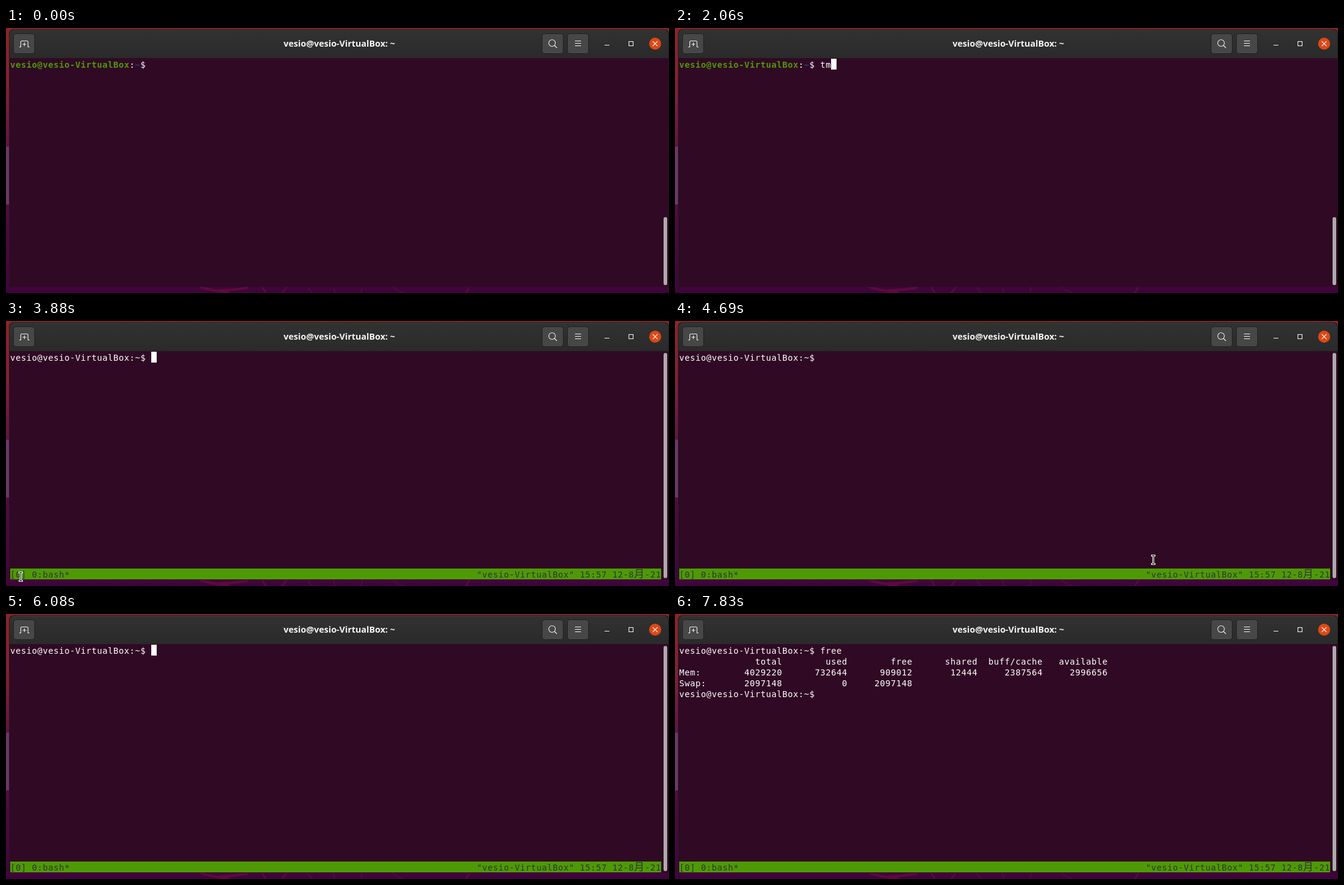
These frames come from a looping animation (1100x440 px, 8 s). An HTML page:

```html
<!DOCTYPE html>
<html lang="en">
<head>
<meta charset="utf-8">
<title>Terminal</title>
<style>
  html, body { margin: 0; width: 1100px; height: 440px; overflow: hidden; background: #300a24; }
  svg { display: block; }
  text { white-space: pre; }
  .mono { font: 14px "DejaVu Sans Mono", monospace; letter-spacing: .572px; fill: #fff; }
  .bold { font-weight: bold; }
  .title { font: bold 14.5px "Open Sans", "Noto Sans", sans-serif; fill: #f4f4f2; text-anchor: middle; }
  .status text { fill: #2e3436; }
  .wide { font: 17px "Noto Sans CJK SC", "Noto Sans CJK JP", sans-serif; }
  .btn { fill: #474747; stroke: #1f1f1f; }
  .icon { fill: none; stroke: #f0f0f0; stroke-width: 1.1; }
</style>
</head>
<body>
<svg width="1100" height="440" viewBox="0 0 1100 440">
  <defs>
    <linearGradient id="side" x2="0" y2="1">
      <stop offset="0" stop-color="#8c2426"/>
      <stop offset=".25" stop-color="#7f1f38"/>
      <stop offset=".5" stop-color="#5c0f46"/>
      <stop offset="1" stop-color="#40043c"/>
    </linearGradient>
    <linearGradient id="head" x2="0" y2="1">
      <stop offset="0" stop-color="#323232"/>
      <stop offset="1" stop-color="#2a2a2a"/>
    </linearGradient>
  </defs>

  <!-- desktop -->
  <rect width="1100" height="440" fill="url(#side)"/>
  <rect y="197" width="6" height="96" fill="#6c3768"/>
  <g fill="none" stroke="#5e0940" stroke-width="2.5">
    <path d="M322 430Q345 437 372 440M352 436Q380 435 402 431" stroke-width="4"/>
    <path d="M425 430L431 440M466 430L458 440M769 430L763 440"/>
    <path d="M500 430L508 440M543 430L546 440M591 430L589 440M641 430Q650 437 660 440" stroke-width="1.5"/>
  </g>

  <!-- window -->
  <path d="M5 430V10Q5 2 13 2H1092Q1100 2 1100 10V430Z" fill="#1c1c1c"/>
  <path d="M6 50V11Q6 3 14 3H1091Q1099 3 1099 11V50Z" fill="url(#head)"/>
  <path d="M12 3.5H1093" stroke="#3c3c3c"/>
  <rect x="6" y="50" width="1094" height="380" fill="#300a24"/>
  <rect x="12.5" y="9.5" width="35" height="33" rx="4" class="btn"/>
  <rect x="889.5" y="9.5" width="35" height="33" rx="4" class="btn"/>
  <rect x="931.5" y="9.5" width="35" height="33" rx="4" class="btn"/>
  <g class="icon">
    <path d="M22 31.5H24.5V23.5Q24.5 21.5 26.5 21.5H34.5Q36.5 21.5 36.5 23.5V31.5H39M30.5 24V30M27.5 27H33.5"/>
    <circle cx="906" cy="25" r="5.5"/>
    <path d="M910 29L914 33M944 21.5H954M944 25.5H954M944 29.5H954M993 28.5H1001"/>
    <rect x="1033.5" y="22.5" width="7" height="7"/>
  </g>
  <circle cx="1077" cy="26" r="10" fill="#dd4814"/>
  <path d="M1073 22L1081 30M1081 22L1073 30" class="icon"/>
  <text x="553" y="31" class="title">vesio@vesio-VirtualBox: ~</text>

  <rect id="thumb" x="1091" width="6" rx="3" fill="#aea9ac"/>
  <g id="shell" class="mono">
    <text x="7" y="66" class="bold" fill="#4e9a06">vesio@vesio-VirtualBox</text>
    <text x="205" y="66">:</text>
    <text x="214" y="66" class="bold" fill="#12488b">~</text>
    <text x="223" y="66">$</text>
  </g>
  <g id="status" class="mono status">
    <rect x="7" y="411" width="1080" height="18" fill="#4e9a06"/>
    <text x="7" y="426">[0] 0:bash*</text>
    <text x="781" y="426">"vesio-VirtualBox" 15:57 12-8</text>
    <text x="1042" y="426" class="wide">月</text>
    <text x="1060" y="426">-21</text>
  </g>
  <g id="rows" class="mono"></g>
  <text id="typed" class="mono" x="241" y="66"></text>
  <rect id="block" width="9" height="18" fill="#fff"/>
  <g id="pointer" fill="none" stroke-linecap="square">
    <path d="M-2 -7H2M0 -7V7M-2 7H2" stroke="#fff" stroke-width="3"/>
    <path d="M-2 -7H2M0 -7V7M-2 7H2" stroke="#111"/>
  </g>
</svg>
<script>
const LOOP = 8000, STEP = 80, BLINK = 580;
const TMUX = 2560, PROMPT = 2640, OUTPUT = 7250;
const PROMPT_COLS = 26;

const $ = id => document.getElementById(id);
const show = (id, on) => $(id).setAttribute('visibility', on ? 'visible' : 'hidden');
const set = (id, attrs) => { for (const k in attrs) $(id).setAttribute(k, attrs[k]); };

// each command with its key times; the negative time sets the first blink phase
const commands = [
  { text: 'tmux', keys: [1900, 2060, 2310, 2310] },
  { text: 'free', keys: [6150, 6330, 6500, 6670] }
];
const presses = [-590, ...commands.flatMap(c => c.keys), TMUX, OUTPUT];

// pointer moves, each from where the last one ended
const home = { x: 943.5, y: 416.5 };
const moves = [
  { from: 80, to: 720, x: 435.5, y: 137.5 },
  { from: 3160, to: 3880, x: 24.5, y: 424.5 },
  { from: 3960, to: 4120, x: 52.5, y: 418.5 },
  { from: 4210, to: 4690, x: 793.5, y: 396.5 },
  { from: 4770, to: 5090, x: 903.5, y: 424.5 },
  { from: 5090, to: 5250, x: 993.5, y: 420.5 },
  { from: 5250, to: 5650, x: 782.5, y: 234.5 }
];

const prompt = 'vesio@vesio-VirtualBox:~$';
const line = (label, ...cells) =>
  label.padEnd(7) + cells.map((c, i) => String(c).padStart(12)).join('');
const lines = [
  prompt,
  line('', 'total', 'used', 'free', 'shared', 'buff/cache', 'available'),
  line('Mem:', 4029220, 732644, 909012, 12444, 2387564, 2996656),
  line('Swap:', 2097148, 0, 2097148),
  prompt
];
const rows = lines.map((s, i) => {
  const el = document.createElementNS('http://www.w3.org/2000/svg', 'text');
  el.setAttribute('x', 7);
  el.setAttribute('y', 66 + 18 * i);
  el.textContent = s;
  return $('rows').appendChild(el);
});

// the screen samples the pointer once per STEP
function pointerAt(t) {
  const i = moves.findLastIndex(m => m.from <= t);
  if (i < 0) return [home.x, home.y];
  const a = moves[i - 1] || home, b = moves[i];
  const gone = Math.floor((t - b.from) / STEP) * STEP;
  const k = Math.min(1, gone / (b.to - b.from));
  const ease = k * k * (3 - 2 * k);
  return ['x', 'y'].map(c => Math.floor(a[c] + (b[c] - a[c]) * ease) + .5);
}

function draw(t) {
  const tmux = t >= TMUX, done = t >= OUTPUT;
  show('shell', !tmux);
  show('status', tmux);
  set('thumb', tmux ? { y: 53, height: 374 } : { y: 314, height: 113 });
  const count = done ? rows.length : t >= PROMPT ? 1 : 0;
  rows.forEach((el, i) => el.setAttribute('visibility', i < count ? 'visible' : 'hidden'));

  const { text, keys } = commands[tmux ? 1 : 0];
  const typed = text.slice(0, keys.filter(k => k <= t).length);
  $('typed').textContent = typed;

  const start = tmux && t < PROMPT ? 0 : PROMPT_COLS;
  const col = start + (done ? 0 : typed.length);
  const lastPress = Math.max(...presses.filter(p => p <= t));
  show('block', Math.floor((t - lastPress) / BLINK) % 2 === 0);
  set('block', { x: 7 + 9 * col, y: done ? 123 : 51 });

  // typing hides the pointer until it moves again
  show('pointer', (t >= 80 && t < 1900) || (t >= 3240 && t < 6080));
  set('pointer', { transform: `translate(${pointerAt(t)})` });
}

const origin = performance.now();
function tick() {
  draw((performance.now() - origin) % LOOP);
  requestAnimationFrame(tick);
}
tick();
</script>
</body>
</html>
```
